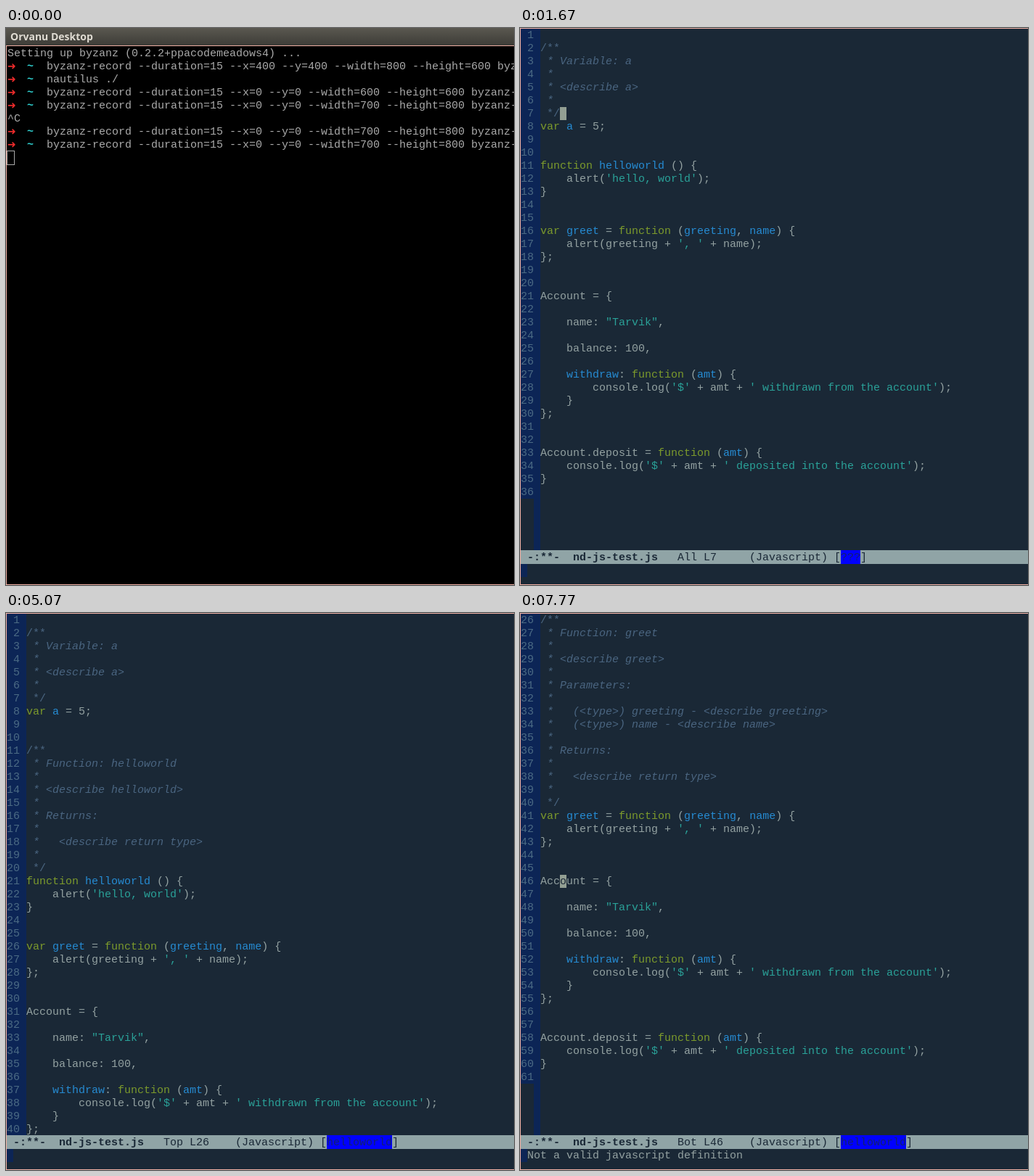
These frames come from a looping animation (700 px wide and 768 px high, 8000 ms). An HTML page:

```html
<!DOCTYPE html>
<html lang="en">
<head>
<meta charset="utf-8">
<title>Editor session</title>
<style>
  html, body { margin: 0; width: 100%; height: 100%; overflow: hidden; background: #000; }
  svg { display: block; }
  text { font: 15px "Liberation Mono", monospace; white-space: pre; fill: #93a1a1; }
  .term { fill: #aaaaaa; }
  .arrow { font: bold 14px "DejaVu Sans", sans-serif; fill: #ee2b2b; }
  .tilde { font-weight: bold; fill: #2fd0d0; }
  .title { font: bold 14px "Open Sans", sans-serif; fill: #dfdbd2; }
  .num { fill: #4b6a84; }
  .kw { fill: #7c9a2c; }
  .id { fill: #268bd2; }
  .str { fill: #2aa198; }
  .doc { fill: #4a6580; font-style: italic; }
  .edge { fill: #4a6580; }
  .mode { fill: #1a2836; }
  .bold { font-weight: bold; }
  .fn { fill: #12206e; }
  .under { fill: #1a2836; }
</style>
</head>
<body>
<svg id="stage" width="700" height="768" viewBox="0 0 700 768">
  <defs>
    <linearGradient id="bar" x2="0" y2="1">
      <stop offset="0" stop-color="#5a5850"/>
      <stop offset="1" stop-color="#3d3c37"/>
    </linearGradient>
  </defs>
  <g id="view"></g>
</svg>
<script>
const LOOP = 8000, CELL = 9, ROW = 18, ROWS = 40, TEXT_X = 28;
const BG = '#1a2836', GUTTER = '#0c2556', GREY = '#90a4a6', EDGE = '#f0b0a4';

const record = (pos, [w, h]) =>
  `byzanz-record --duration=15 --x=${pos} --y=${pos} --width=${w} --height=${h} byzanz-demo.gif`;
const shell = [
  'Setting up byzanz (0.2.2+ppacodemeadows4) ...',
  '$' + record(400, [800, 600]),
  '$nautilus ./',
  '$' + record(0, [600, 600]),
  '$' + record(0, [700, 800]),
  '^C',
  '$' + record(0, [700, 800]),
  '$' + record(0, [700, 800])
];

const code = `
var a = 5;


function helloworld () {
    alert('hello, world');
}


var greet = function (greeting, name) {
    alert(greeting + ', ' + name);
};


Account = {

    name: "Tarvik",

    balance: 100,

    withdraw: function (amt) {
        console.log('$' + amt + ' withdrawn from the account');
    }
};


Account.deposit = function (amt) {
    console.log('$' + amt + ' deposited into the account');
}
`.split('\n');

const block = body => ['/**', ...body.map(s => s ? ' * ' + s : ' *'), ' */'];
const returns = ['Returns:', '', '  <describe return type>', ''];
const docs = [
  ['var a', block(['Variable: a', '', '<describe a>', ''])],
  ['function h', block(['Function: helloworld', '', '<describe helloworld>', '', ...returns])],
  ['var greet', block(['Function: greet', '', '<describe greet>', '', 'Parameters:', '',
    '  (<type>) greeting - <describe greeting>', '  (<type>) name - <describe name>', '', ...returns])]
];

// Each step changes only what it names; the rest carries over.
const steps = [
  { t: 0, editor: 0 },
  { t: 250, editor: 0.5, docs: 0, top: 1, line: 2, col: 0, on: false,
    flags: '---', pos: 'All', fn: '???', msg: '(No changes need to be saved)' },
  { t: 340, editor: 1 },
  { t: 690, on: true },
  { t: 1140, on: false },
  { t: 1310, msg: '' },
  { t: 1590, docs: 1, line: 7, col: 3, on: true, flags: '**-' },
  { t: 2000, line: 8 },
  { t: 2180, line: 9 },
  { t: 2310, line: 10 },
  { t: 2440, line: 11 },
  { t: 3210, docs: 2, line: 20, pos: 'Top' },
  { t: 3690, on: false },
  { t: 3740, on: true, line: 21, fn: 'helloworld' },
  { t: 4200, line: 22 },
  { t: 4250, line: 23 },
  { t: 4300, line: 25 },
  { t: 4580, line: 26 },
  { t: 5070, on: false },
  { t: 5430, docs: 3, top: 20, line: 40, on: true, pos: '22%' },
  { t: 5870, on: false },
  { t: 5920, on: true, line: 41 },
  { t: 6390, line: 42 },
  { t: 6440, line: 43 },
  { t: 6490, line: 45 },
  { t: 6690, line: 46 },
  { t: 7240, top: 26, pos: 'Bot' },
  { t: 7770, msg: 'Not a valid javascript definition' }
];
for (let i = 1; i < steps.length; i++) steps[i] = { ...steps[i - 1], ...steps[i] };

const escape = s => s.replace(/&/g, '&amp;').replace(/</g, '&lt;');
const span = (s, cls) => `<tspan class="${cls}">${escape(s)}</tspan>`;
const rect = (x, y, w, h, fill) => `<rect x="${x}" y="${y}" width="${w}" height="${h}" fill="${fill}"/>`;
const rawText = (x, y, inner, cls = '') => `<text x="${x}" y="${y}" class="${cls}">${inner}</text>`;
const text = (x, y, s, cls) => rawText(x, y, escape(s), cls);
const frame = y => rect(0, y, 700, 1, EDGE) + rect(0, y, 1, 768 - y, EDGE) + rect(0, 767, 700, 1, EDGE);

// Groups: string, keyword, defined name or parameter.
const token = /('[^']*'|"[^"]*")|\b(var|function)\b|((?<=\b(?:var|function) )\w+|(?<=function \([^)]*)\w+|\w+(?=: function))/g;

function highlight(line) {
  if (/^(\/\*\*| \*\/)$/.test(line)) return span(line, 'edge');
  if (line.startsWith(' *')) return span(line, 'doc');
  let out = '', last = 0;
  for (const m of line.matchAll(token)) {
    out += escape(line.slice(last, m.index)) + span(m[0], m[1] ? 'str' : m[2] ? 'kw' : 'id');
    last = m.index + m[0].length;
  }
  return out + escape(line.slice(last));
}

function buffer(count) {
  const active = docs.slice(0, count);
  return code.flatMap(line => {
    const hit = active.find(([start]) => line.startsWith(start));
    return hit ? [...hit[1], line] : [line];
  });
}

function drawShell() {
  let out = rect(0, 0, 700, 768, '#000') + rect(0, 0, 700, 24, 'url(#bar)') +
    text(6, 17, 'Orvanu Desktop', 'title') + frame(24);
  shell.forEach((line, i) => {
    const y = 39 + i * ROW;
    if (line[0] !== '$') { out += text(2, y, line, 'term'); return; }
    out += text(2, y, '➜', 'arrow') + text(29, y, '~', 'tilde') + text(56, y, line.slice(1), 'term');
  });
  return out + '<rect x="1.5" y="169.5" width="10" height="19" fill="none" stroke="#aaa"/>';
}

function drawCursor(s, line) {
  const col = Math.min(s.col, line.length);
  const x = TEXT_X + col * CELL, y = 1 + (s.line - s.top) * ROW;
  return rect(x, y, CELL, ROW, '#939f93') + text(x, y + 13, line[col] || '', 'under');
}

function drawModeLine(s) {
  const at = col => 1 + col * CELL;
  return rect(1, 720, 699, 19, GREY) +
    text(at(1), 734, '-:' + s.flags, 'mode bold') +
    text(at(8), 734, 'nd-js-test.js', 'mode bold') +
    text(at(24), 734, `${s.pos} L${s.line}`, 'mode') +
    text(at(35), 734, '(Javascript) [', 'mode') +
    rect(at(49), 720, s.fn.length * CELL, 19, '#0000ff') +
    text(at(49), 734, s.fn, 'fn') +
    text(at(49 + s.fn.length), 734, ']', 'mode');
}

function drawEditor(s) {
  const lines = buffer(s.docs);
  const shown = lines.slice(s.top - 1, s.top - 1 + ROWS);
  let out = rect(0, 0, 700, 768, BG) + rect(1, 1, 18, shown.length * ROW, GUTTER) +
    rect(19, 1, 9, 719, GUTTER) + rect(1, 739, 9, ROW, GUTTER);
  shown.forEach((line, i) => {
    const y = 14 + i * ROW;
    out += text(1, y, String(s.top + i).padStart(2), 'num') + rawText(TEXT_X, y, highlight(line));
  });
  if (s.on) out += drawCursor(s, lines[s.line - 1]);
  return out + drawModeLine(s) + text(10, 752, s.msg) + frame(0);
}

function draw(s) {
  const back = s.editor < 1 ? drawShell() : '';
  const front = s.editor > 0 ? `<g opacity="${s.editor}">${drawEditor(s)}</g>` : '';
  return back + front;
}

const view = document.getElementById('view');
const start = performance.now();
let current = null;

function tick() {
  const t = (performance.now() - start) % LOOP;
  const step = steps.findLast(s => s.t <= t);
  if (step !== current) {
    current = step;
    view.innerHTML = draw(step);
  }
  requestAnimationFrame(tick);
}
tick();
</script>
</body>
</html>
```
